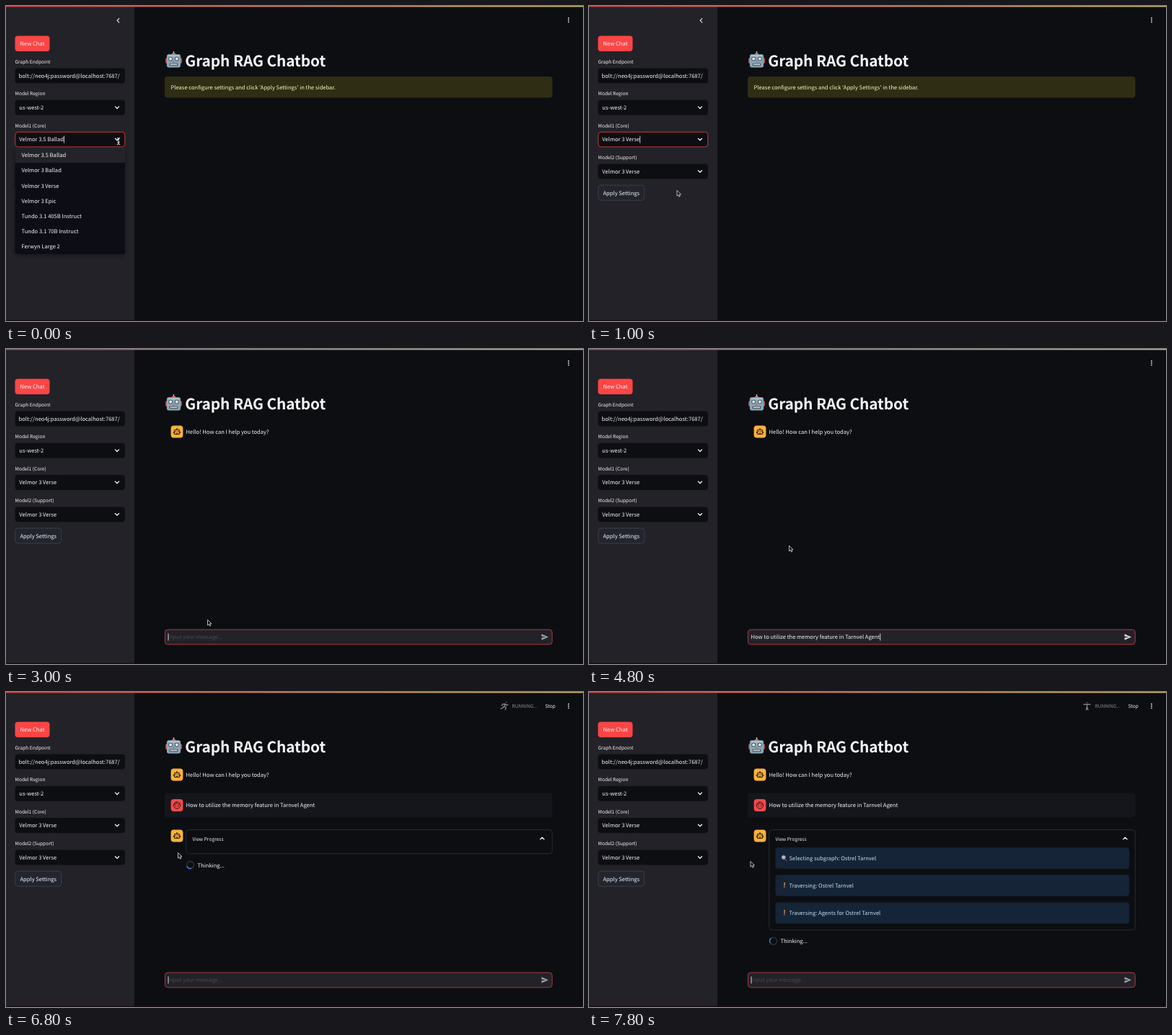
Animation, 800 px wide and 438 px high, one loop 8 s. Source, as an HTML page:

```html
<!DOCTYPE html>
<html lang="en">
<head>
<meta charset="utf-8">
<title>Graph RAG Chatbot</title>
<style>
html, body { margin: 0; width: 100%; height: 100%; overflow: hidden; background: #0d0e12; }
svg { display: block; width: 100vw; height: 100vh; }
text {
  font: 7.6px "Noto Sans CJK SC", "Noto Sans CJK JP", "Source Sans Pro", "Open Sans", sans-serif;
  fill: #f6f6f8; text-rendering: geometricPrecision; white-space: pre;
}
text.s { font-size: 6.65px; }
text.h { font-size: 20.9px; font-weight: 700; letter-spacing: -.117px; }
.line { fill: none; stroke: #f4f4f6; stroke-linecap: round; stroke-linejoin: round; }
.ink { fill: none; stroke: #17130c; stroke-width: .9; }
.man { fill: none; stroke: #7f8189; stroke-width: 1.4; stroke-linecap: round; stroke-linejoin: round; }
</style>
</head>
<body>
<svg id="stage" viewBox="0 0 800 438" xmlns="http://www.w3.org/2000/svg"></svg>
<script>
const LOOP = 8000, STEP = 200;
const BG = '#0d0e12', PANEL = '#232228', RED = '#fc4646';
const models = ['Velmor 3.5 Ballad', 'Velmor 3 Ballad', 'Velmor 3 Verse', 'Velmor 3 Epic',
  'Tundo 3.1 405B Instruct', 'Tundo 3.1 70B Instruct', 'Ferwyn Large 2'];
const question = 'How to utilize the memory feature in Tarnvel Agent';

// Building blocks; y is the vertical centre of a text line.
const text = (x, y, s, attrs = '') => `<text x="${x}" y="${y + 2.8}" ${attrs}>${s}</text>`;
const small = (x, y, s, attrs = '') => `<text class="s" x="${x}" y="${y + 2.5}" ${attrs}>${s}</text>`;
const box = (x, y, w, h, fill, attrs = '') =>
  `<rect x="${x}" y="${y}" width="${w}" height="${h}" rx="4" fill="${fill}" ${attrs}/>`;
const during = (from, to, body) => `<g data-on="${from} ${to}">${body}</g>`;
const chevron = (x, y, d = 1) =>
  `<path class="line" stroke-width="1.3" d="M${x - 2.6} ${y - 1.3 * d}l2.6 ${2.6 * d}l2.6 ${-2.6 * d}"/>`;
const field = (y, label) => small(12.5, y - 19.3, label) + box(12.5, y - 10.5, 152.5, 21, BG);
const outline = (x, y, w, h, color) => box(x, y, w, h, 'none', `stroke="${color}" stroke-width=".9"`);

const botAvatar = y => `<g transform="translate(237 ${y})">
  ${box(-8.4, -8.4, 16.8, 16.8, '#fdb13c')}
  <path class="ink" d="M-3.4 -2.5h6.8v6h-6.8zM0 -2.5v-1.8M-3.4 .2h-1.3v1.5h1.3M3.4 .2h1.3v1.5h-1.3M-1.5 2.2h3"/>
  <circle cy="-4.2" r=".8" fill="#17130c"/><circle cx="-1.5" cy="-.2" r=".7"/><circle cx="1.5" cy="-.2" r=".7"/></g>`;

const userAvatar = y => `<g transform="translate(237 ${y})">
  ${box(-8.4, -8.4, 16.8, 16.8, '#f6484c')}
  <circle class="ink" r="4.6" stroke="#2c0b10"/>
  <path class="ink" d="M-4.4 -.8Q-1.2 -1 -.7 -3.5Q1 -1 4.4 -1.2"/>
  <circle cx="-1.6" cy="1" r=".7"/><circle cx="1.6" cy="1" r=".7"/></g>`;

const robot = `<g transform="translate(232.5 75)">
  <path d="M-3.5 -7.5Q0 -13 3.5 -7.5z" fill="#e0574c"/>
  <path d="M0 -9v-3" stroke="#a9bcc6" stroke-width="1.4"/>
  <rect x="-11.3" y="-3" width="22.6" height="8" rx="2" fill="#d2594e"/>
  <path d="M-8 -7.5h16q1.6 0 1.6 2v13q0 3 -3 3h-13.2q-3 0 -3 -3v-13q0 -2 1.6 -2z" fill="#86a7b8"/>
  <path d="M-8 -7.5h16l-1 3h-14z" fill="#a9c3cf"/>
  <circle cx="-4.3" cy="-1.6" r="3" fill="#4c5f6b"/><circle cx="4.3" cy="-1.6" r="3" fill="#4c5f6b"/>
  <circle cx="-4.3" cy="-1.6" r="1.9" fill="#e9f3f2"/><circle cx="4.3" cy="-1.6" r="1.9" fill="#e9f3f2"/>
  <path d="M0 .6l1.5 2.6h-3z" fill="#d2594e"/>
  <rect x="-5.8" y="4.4" width="11.6" height="3.8" rx="1.2" fill="#3f4d57"/>
  <path d="M-4.6 6.3h9.2" stroke="#e4eaec" stroke-width="2" stroke-dasharray="1.5 .5"/></g>`;

const lens = `<path d="M271.6 232.2l2.4 2.6" stroke="#6d4a4c" stroke-width="1.4" stroke-linecap="round"/>
  <circle cx="269.8" cy="229.8" r="2.6" fill="#a9bccb" stroke="#8c8f98" stroke-width=".8"/>`;
const walker = y => `<g transform="translate(271 ${y})" fill="none" stroke-width="1.1">
  <circle cy="-3.2" r="1" fill="#e0a23c"/><path d="M0 -2v2.4" stroke="#c9803a" stroke-width="1.7"/>
  <path d="M0 .3l-1.2 3.2M0 .3l1 3.2" stroke="#5a5560"/></g>`;
const info = (y, icon, s) => box(258.5, y - 14.8, 490.5, 29.6, '#152437') + icon +
  text(277.5, y, s, 'style="fill:#c4e2f6"');

const sidebar = `
  <rect width="178" height="438" fill="${PANEL}"/>
  ${during(0, 2400, '<path class="line" stroke-width="1.1" d="M156.8 17.4l-2.7 2.7l2.7 2.7"/>')}
  ${box(12.5, 41.5, 48, 21.5, RED)}${text(19.5, 52.5, 'New Chat')}
  ${field(97, 'Graph Endpoint')}${text(17.5, 97, 'bolt://neo4j:password@localhost:7687/')}
  ${field(141.2, 'Model Region')}${text(18.3, 141.2, 'us-west-2')}${chevron(154, 141.2)}
  ${field(185.5, 'Model1 (Core)')}${chevron(154, 185.5)}
  ${during(0, 800, text(18.3, 185.5, models[0], 'id="first"'))}
  ${during(800, LOOP, text(18.3, 185.5, models[2], 'id="second"'))}
  ${during(0, 1600, outline(12.8, 175.3, 152, 20.6, '#d84043'))}
  ${field(230, 'Model2 (Support)')}${text(18.3, 230, models[2])}${chevron(154, 230)}
  ${box(12.8, 249.2, 64, 21, '#23252e', 'stroke="#474952" stroke-width=".7"')}
  ${text(19.5, 259.8, 'Apply Settings')}
  ${during(1400, 2800, box(12.8, 249.2, 64, 21, '#23252e', `stroke="${RED}" stroke-width=".8"`) +
    text(19.5, 259.8, 'Apply Settings', `style="fill:${RED}"`))}
  ${during(0, 800, box(12.5, 197, 152.5, 148, BG, 'filter="url(#shade)"') +
    '<rect id="option" x="12.5" y="197" width="152.5" height="21" fill="#232329"/>' +
    models.map((m, i) => text(21.5, 207.5 + i * 21.17, m)).join(''))}`;

const status = `
  <path id="poseA" class="man" d="M692.3 16.3l-1.6 3.4l2.6 1.9l-1 3M690.7 19.7l-2 2.5l-2.6 1M692.2 16.5l-3.5 .3l-1.2 2M692.2 16.5l1.6 2l2 -.8M693.6 14v.1"/>
  <path id="poseB" class="man" d="M686 17.3h9M690.5 17.3v3.2l-1.2 4.3M690.5 20.5l1.2 4.3M690.5 14.6v.1"/>
  ${small(701.5, 19.6, 'RUNNING...', 'style="fill:#8a8c95"')}${small(747.5, 19.6, 'Stop')}`;

const progress = `
  ${during(6200, 7200, outline(249.8, 191.6, 507.5, 33.2, '#2d2f36'))}
  ${during(7200, 7400, outline(249.8, 191.6, 507.5, 63, '#2d2f36'))}
  ${during(7400, 7600, outline(249.8, 191.6, 507.5, 101, '#2d2f36'))}
  ${during(7600, LOOP, outline(249.8, 191.6, 507.5, 139.2, '#2d2f36'))}
  ${botAvatar(200)}${small(258.5, 204, 'View Progress')}${chevron(743.4, 203.5, -1)}
  ${during(7200, LOOP, info(231, lens, 'Selecting subgraph: Ostrel Tarnvel'))}
  ${during(7400, LOOP, info(269, walker(269), 'Traversing: Ostrel Tarnvel'))}
  ${during(7600, LOOP, info(307.3, walker(307.3), 'Traversing: Agents for Ostrel Tarnvel'))}
  <g id="thinking"><circle cx="255.5" r="5" fill="none" stroke="#30343e" stroke-width="1.3"/>
  <path id="arc" d="M3.54 -3.54A5 5 0 0 1 3.54 3.54" fill="none" stroke="#4a7fe0" stroke-width="1.3"/>
  ${text(265.5, .2, 'Thinking...')}</g>`;

const send = color => `<path d="M742.5 396.3l9.6 4.2l-9.6 4.2v-3.3l6.2 -.9l-6.2 -.9z" fill="${color}"/>`;
const chat = `
  ${botAvatar(115)}${text(249.5, 115, 'Hello! How can I help you today?')}
  ${box(220, 389.8, 537.5, 21.2, PANEL)}
  ${during(2800, LOOP, outline(220.4, 390.2, 536.8, 20.6, '#bb3a40'))}
  ${during(1800, 3800, text(224.5, 400.5, 'Input your message...', 'id="hint" style="fill:#4a4a52"') + send('#9fa0a8'))}
  ${during(3800, 6000, text(224.5, 400.5, question, 'id="message"') + send('#d4d5da'))}
  ${during(6000, LOOP, text(224.5, 400.5, 'Input your message...', 'style="fill:#4a4a52"') + send('#9fa0a8'))}`;

const stage = document.getElementById('stage');
stage.innerHTML = `
  <defs>
    <linearGradient id="strip"><stop stop-color="#c4454a"/><stop offset="1" stop-color="#cdbb6a"/></linearGradient>
    <filter id="shade" x="-10%" y="-10%" width="120%" height="125%">
      <feDropShadow dx="0" dy="2" stdDeviation="3" flood-opacity=".35"/></filter>
  </defs>
  <rect width="800" height="438" fill="${BG}"/>
  ${sidebar}
  <rect width="800" height="1.3" fill="url(#strip)"/>
  <rect y="436.7" width="800" height="1.3" fill="#150a14"/>
  <g fill="#f4f4f6"><circle cx="780" cy="16.7" r=".9"/><circle cx="780" cy="19.5" r=".9"/><circle cx="780" cy="22.3" r=".9"/></g>
  ${robot}<text class="h" x="248.3" y="84">Graph RAG Chatbot</text>
  ${during(0, 1800, box(220, 98, 537.5, 29.6, '#302d15') +
    text(228.5, 113, "Please configure settings and click 'Apply Settings' in the sidebar.", 'style="fill:#fbf9c2"'))}
  ${during(1800, LOOP, chat)}
  ${during(6000, LOOP, status + box(220, 140.8, 537.5, 33.4, '#15161b') + userAvatar(157.5) + text(249.5, 157.5, question))}
  ${during(6200, LOOP, progress)}
  <path id="caret" d="M0 -5v10" stroke="#f4f4f6" stroke-width=".8"/>
  <g id="mouse">
    <path id="arrow" d="M0 0V7.6L1.8 6L3 8.7L4.3 8.1L3.1 5.5H5.5Z" fill="#0b0b0d" stroke="#ececef" stroke-width=".75"/>
    <path id="beam" class="line" stroke-width="1" d="M-1.8 -4.5Q0 -4.5 0 -3.2Q0 -4.5 1.8 -4.5M0 -3.2V3.2M-1.8 4.5Q0 4.5 0 3.2Q0 4.5 1.8 4.5M-1.2 1.4h2.4"/>
  </g>`;

const $ = id => document.getElementById(id);
const show = (node, on) => node.setAttribute('display', on ? 'inline' : 'none');
const move = (node, x, y) => node.setAttribute('transform', `translate(${x} ${y})`);

// time, x, y of the pointer
const path = [[0, 156, 188], [200, 150, 205], [400, 135, 228], [600, 124, 249], [800, 122, 256.5],
  [1000, 122, 256.5], [1200, 112, 258], [1400, 74, 261], [1600, 70, 261], [2000, 79, 261],
  [2200, 120, 285], [2400, 200, 340], [2600, 262, 397], [2800, 275, 398], [3000, 279.5, 376.5],
  [3400, 278.5, 300], [4400, 277.5, 273.5], [6000, 277.5, 273.5], [6400, 260, 248],
  [6800, 238.5, 223.5], [7400, 226, 233], [7800, 224, 235.5]];

function pointer(t) {
  const i = path.findIndex(p => p[0] > t);
  if (i < 0) return path[path.length - 1].slice(1);
  const [a, ax, ay] = path[i - 1], [b, bx, by] = path[i], k = (t - a) / (b - a);
  return [ax + (bx - ax) * k, ay + (by - ay) * k];
}

const inside = (t, [from, to]) => t >= from && t < to;
const blinks = [[400, 800], [3200, 3600], [4400, 4800], [5200, 5600], [6200, 6600], [7200, 7600]];
const timed = [...stage.querySelectorAll('[data-on]')].map(n => [n, n.dataset.on.split(' ').map(Number)]);

function caretPlace(t) {
  const after = id => 18.8 + $(id).getComputedTextLength();
  if (t < 800) return [after('first'), 185.5];
  if (t < 1600) return [after('second'), 185.5];
  if (t >= 3800 && t < 6000) return [225 + $('message').getComputedTextLength(), 400.5];
  return [225, 400.5];
}

function draw(t) {
  for (const [node, span] of timed) show(node, inside(t, span));
  $('option').setAttribute('y', 197 + 21.17 * Math.max(0, Math.min(2, t / STEP - 1)));

  show($('caret'), !inside(t, [1600, 2800]) && !blinks.some(b => inside(t, b)));
  move($('caret'), ...caretPlace(t));

  const beam = t < 200 || inside(t, [2600, 3000]);
  show($('beam'), beam);
  show($('arrow'), !beam);
  move($('mouse'), ...pointer(t));

  const even = t / STEP % 2 === 0;
  show($('poseA'), even);
  show($('poseB'), !even);
  move($('thinking'), 0, t < 7200 ? 240.5 : t < 7400 ? 270 : t < 7600 ? 308 : 346.2);
  $('arc').setAttribute('transform', `translate(255.5 0) rotate(${115 + (t - 6800) * .435})`);
}

let start, last;
function tick(now) {
  start ??= now;
  const t = Math.floor((now - start) % LOOP / STEP) * STEP;
  if (t !== last) draw(last = t);
  requestAnimationFrame(tick);
}
draw(0);
requestAnimationFrame(tick);
</script>
</body>
</html>
```
